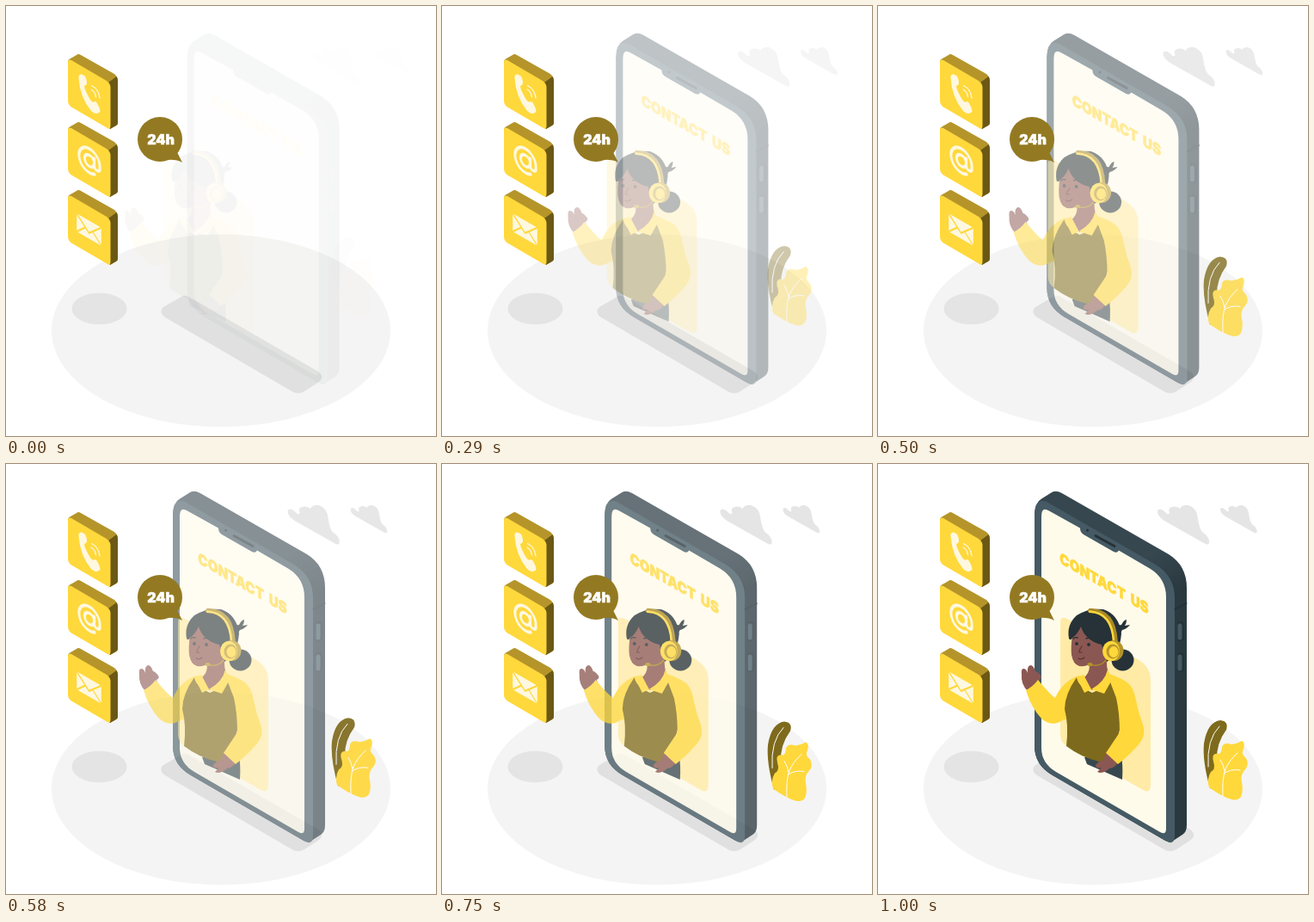
An HTML page for the animation above (1040 ms loop, 500 px wide and 500 px high).

```html
<!DOCTYPE html>
<html lang="en">
<head>
<meta charset="utf-8">
<title>Contact us</title>
<style>
html, body { margin: 0; width: 100%; height: 100%; overflow: hidden; background: #fff; }
svg { display: block; width: 100vw; height: 100vh; }
text { font-family: Inter, Roboto, sans-serif; font-weight: 900; text-anchor: middle; stroke-width: .6; }
.y { fill: #ffd83b; }
.gold { fill: #b5952a; }
.olive { fill: #7e6a1c; }
.skin { fill: #8b5752; }
.dark { fill: #263238; }
.pale { fill: #fff8e0; }
.line { fill: none; stroke-linecap: round; stroke-linejoin: round; }
</style>
</head>
<body>
<svg viewBox="0 0 500 500">
  <defs>
    <linearGradient id="edge" gradientUnits="userSpaceOnUse" x1="325" y1="100" x2="352" y2="145">
      <stop stop-color="#37474f"/>
      <stop offset="1" stop-color="#2a3940"/>
    </linearGradient>
    <g id="card">
      <path class="gold" d="M72 66Q72 62 75 61L82 57Q84 55 87 57L126 79Q130 82 130 87V136Q130 138 128 139L121 143L76 116Z"/>
      <path fill="#6b5815" d="M119 89L128.500 82Q130 84 130 87V136Q130 138 128 139L121 143Z"/>
      <path class="y" d="M72 66Q72 61 76 63L117 87Q121.500 90 121.500 95V139Q121.500 144 118 142L76 117.500Q72 115 72 110Z"/>
    </g>
    <path id="cloud" fill="#e5e5e5" d="M325 54Q328 50 334 56Q337 60 339 57Q336 50 344 49.500Q349 49 351 52Q354 47 361 48Q371 51 372 64Q374 76 377 79Q386 85 385 92Q384 95 379 92L333 66Q324 60 325 54Z"/>
  </defs>

  <ellipse cx="250" cy="377.500" rx="197" ry="112" fill="#f4f4f4"/>
  <ellipse cx="108.500" cy="352" rx="32" ry="18.300" fill="#e4e4e4"/>
  <path fill="#e0e0e0" d="M183 350L203 338.500Q208 335 214 339L363 425Q371 431 364 437L347 448Q341 452 334 449L185 362Q177 356 183 350Z"/>

  <g id="clouds">
    <use href="#cloud"/>
    <use href="#cloud" transform="translate(398 48) scale(.71) translate(-325 -48)"/>
  </g>

  <g id="plant">
    <path class="olive" d="M386 377Q377 345 379 325Q383 300 398 298Q408 299 405 309Q393 325 394 345Q394 360 398 380Z"/>
    <path class="line" stroke="#fff" d="M384 352Q382 320 397 305"/>
    <path class="y" d="M385 376Q382 366 387 358Q393 355 390 346Q387 335 397 337Q400 334 400 329Q402 323 411 326Q418 325 423 322Q428 324 424 334Q423 338 428 342Q432 350 427 355Q421 361 423 370Q425 380 422 387Q418 392 411 390Q400 387 385 376Z"/>
    <path class="line" stroke="#fff" d="M401 386Q400 365 404 355Q408 345 418 336M403 357Q402 350 398 344M402 360Q410 354 421 356"/>
  </g>

  <g id="phone">
    <path fill="url(#edge)" d="M182 60Q182 45 190 40.500L202 33Q207 30 214 34L338 105Q359 118 359 144V420Q359 428 354 431L344 437.500Q340 441 334 438L203 362Q182 350 182 328Z"/>
    <path fill="#455a64" d="M182 61Q182 38 197 44.500L322 116.500Q345 130 345 156V432Q345 444 335 438.300L203 362Q182 350 182 328Z"/>
    <path fill="#fffbeb" d="M190 61Q190 49 199 54.500L235 74.500Q235 79.500 239 82L274 102Q278 104 280 100.500L316 121.500Q335 133 335 155V424Q335 432 328 428L207 358Q190 348 190 330Z"/>
    <path class="line" stroke="#263238" stroke-width="3" d="M253 83.500L275 95.500M243.500 77h.1"/>
    <path class="line" stroke="#263238" stroke-width="2" d="M345.500 169L358.500 162"/>
    <path class="line" stroke="#263238" stroke-width="8" d="M352 187V202M352 223V238"/>
    <path class="line" stroke="#455a64" stroke-width="5" d="M351 188V202M351 224V238"/>
    <text class="y" transform="matrix(.866 .5 0 1 263 138.500)" y="6.400" font-size="17.500" word-spacing="3" stroke="#ffd83b">CONTACT US</text>
  </g>

  <g id="agent">
    <path fill="#ffeba6" d="M212 184Q212 176 220 180L302 227Q317 236 317 251V373Q317 384 308 379L221 329Q212 324 212 314Z"/>
    <path class="skin" d="M174 264Q166 256 167 245Q166 237 170 238Q173 239 174 243Q173 234 178 234Q181 235 183 241Q185 241 189 246Q191 249 187 251L189 256Z"/>
    <path class="y" d="M172 263Q180 259 186 251Q200 268 206 272Q215 252 234 246L238 300L216 297Q203 307 190 296Q178 283 172 263Z"/>
    <path fill="#37474f" d="M240 341L283 340Q285 350 284 367L243 349Z"/>
    <path class="olive" d="M231 248Q232 258 249 266Q262 262 270 248L276 252Q277 275 284 285Q283 310 275 328L272 342Q264 346 257 346Q236 341 219 328Q222 304 217 285Q217 268 231 248Z"/>
    <path class="skin" d="M266 334L280 346Q276 353 269 354Q262 361 255 358Q258 355 260 353Q253 355 253 350Q256 346 262 344Z"/>
    <path class="y" d="M266 243Q281 248 290 254Q297 259 300 275Q303 290 308 303Q312 315 304 325Q292 339 279 349L265 336Q273 324 281 312Q281 290 277 272Z"/>
    <path class="skin" d="M246 226L266 222Q265 238 269 245Q260 258 249 263Q240 257 238 249Q246 245 246 234Z"/>
    <path class="y" d="M239 245L248 262L240 266L231 248ZM267 239L272 251L263 267L248 262Q264 253 267 239Z"/>
    <ellipse class="dark" cx="284.500" cy="228" rx="13" ry="12.500"/>
    <path class="dark" d="M274 184Q280 188 283 187Q286 181 289 181Q289 185 287 188L293 187Q289 192 284 193L280 200Z"/>
    <path class="skin" d="M226 198Q224 213 225 222Q227 233 234 235Q242 236 250 231L266 228L266 195L250 180L230 185Z"/>
    <path class="dark" d="M222 203Q219 187 231 176Q245 167 262 169Q280 175 283 197Q281 222 266 230Q262 220 260 210Q250 208 243 201Q238 196 236 189Q232 198 226 202Q224 206 222 203Z"/>
    <circle class="dark" cx="231" cy="209" r="1.900"/>
    <circle class="dark" cx="245" cy="210" r="1.900"/>
    <path class="line" stroke="#263238" stroke-width="1.400" d="M227 203q2 -2 5 -1M242 203q4 -2 7 1"/>
    <path class="line" stroke="#5d302f" stroke-width="1.200" d="M237 212q-4 6 -3 7l3 0M233 226q4 2 7 -1"/>
    <path class="line" stroke="#a98a28" stroke-width="5.500" d="M247 170.500Q274 171 276 206"/>
    <path class="line" stroke="#ffd83b" stroke-width="2.600" d="M246 171.500Q272 173 274 206"/>
    <path class="line" stroke="#a98a28" stroke-width="1.500" d="M265 228Q258 237 246 233"/>
    <ellipse class="gold" cx="246.500" cy="233" rx="3" ry="2"/>
    <ellipse class="gold" cx="274" cy="217" rx="11.500" ry="12"/>
    <ellipse class="y" cx="271" cy="217.500" rx="10" ry="11.500"/>
    <ellipse class="gold" cx="273" cy="218" rx="7.500" ry="8.500"/>
    <ellipse class="y" cx="274" cy="218.500" rx="5.500" ry="6.500"/>
  </g>

  <use href="#card"/>
  <use href="#card" y="79"/>
  <use href="#card" y="158"/>
  <path class="pale" d="M84.500 84Q84 79 88 79.500L91 81Q93 82 94 88Q94.500 92 91 93Q91 97 98 109Q101 113 103 111Q105 110 108 117Q111 124 108 124Q104 127 99 122Q86 106 84.500 84Z"/>
  <path class="line" stroke="#fff8e0" stroke-width="1.300" d="M99 97Q104 100 104.500 106M99.500 92.500Q108 97 109 107"/>
  <path class="line" stroke="#fff8e0" stroke-width="3.600" transform="matrix(.866 .5 0 1 97 180)" d="M6.500 -6V3A3.800 4 0 0 0 14 3V0A14 14 0 1 0 7 12.100M6.500 0A6.500 6.500 0 1 1 -6.500 0A6.500 6.500 0 1 1 6.500 0"/>
  <g transform="matrix(.866 .5 0 1 96.500 260)">
    <rect class="pale" x="-16.500" y="-10.500" width="33" height="21" rx="1"/>
    <path class="line" stroke="#ffd83b" stroke-width="1.800" d="M-16 -10L0 4L16 -10M-16 10L-5 0M16 10L5 0"/>
  </g>

  <path fill="#937a22" d="M187 179Q198 178 205 182L198 168Z"/>
  <circle cx="179" cy="155" r="26" fill="#937a22"/>
  <text x="180" y="161" font-size="16" fill="#fff" stroke="#fff">24h</text>
</svg>
<script>
const LOOP = 1040, STEPS = 25;
const part = id => document.getElementById(id);
const [phone, agent, clouds, plant] = ['phone', 'agent', 'clouds', 'plant'].map(part);

// One coordinate of a cubic Bezier that runs from 0 to 1
const cubic = (a, b, s) => 3 * a * s * (1 - s) ** 2 + 3 * b * s * s * (1 - s) + s ** 3;

// Ease that overshoots before it settles
function overshoot(x) {
  let lo = 0, hi = 1;
  for (let i = 0; i < 24; i++) {
    const mid = (lo + hi) / 2;
    if (cubic(.36, .5, mid) < x) lo = mid; else hi = mid;
  }
  return cubic(-.01, 1.38, lo);
}

function place(el, progress, dx, dy) {
  const rest = 1 - progress;
  el.setAttribute('transform', `translate(${dx * rest} ${dy * rest})`);
  el.setAttribute('opacity', Math.max(0, Math.min(1, progress)));
}

function draw(now) {
  const step = Math.floor((now % LOOP + 5) / (LOOP / STEPS)) % STEPS;
  const p = (step + 1) / STEPS, q = overshoot(p);
  place(phone, p, 30, 0);
  place(agent, p, -30, 0);
  place(clouds, q, 30, 0);
  place(plant, q, 0, -30);
}

const start = performance.now();
function tick() {
  draw(performance.now() - start);
  requestAnimationFrame(tick);
}
tick();
</script>
</body>
</html>
```
